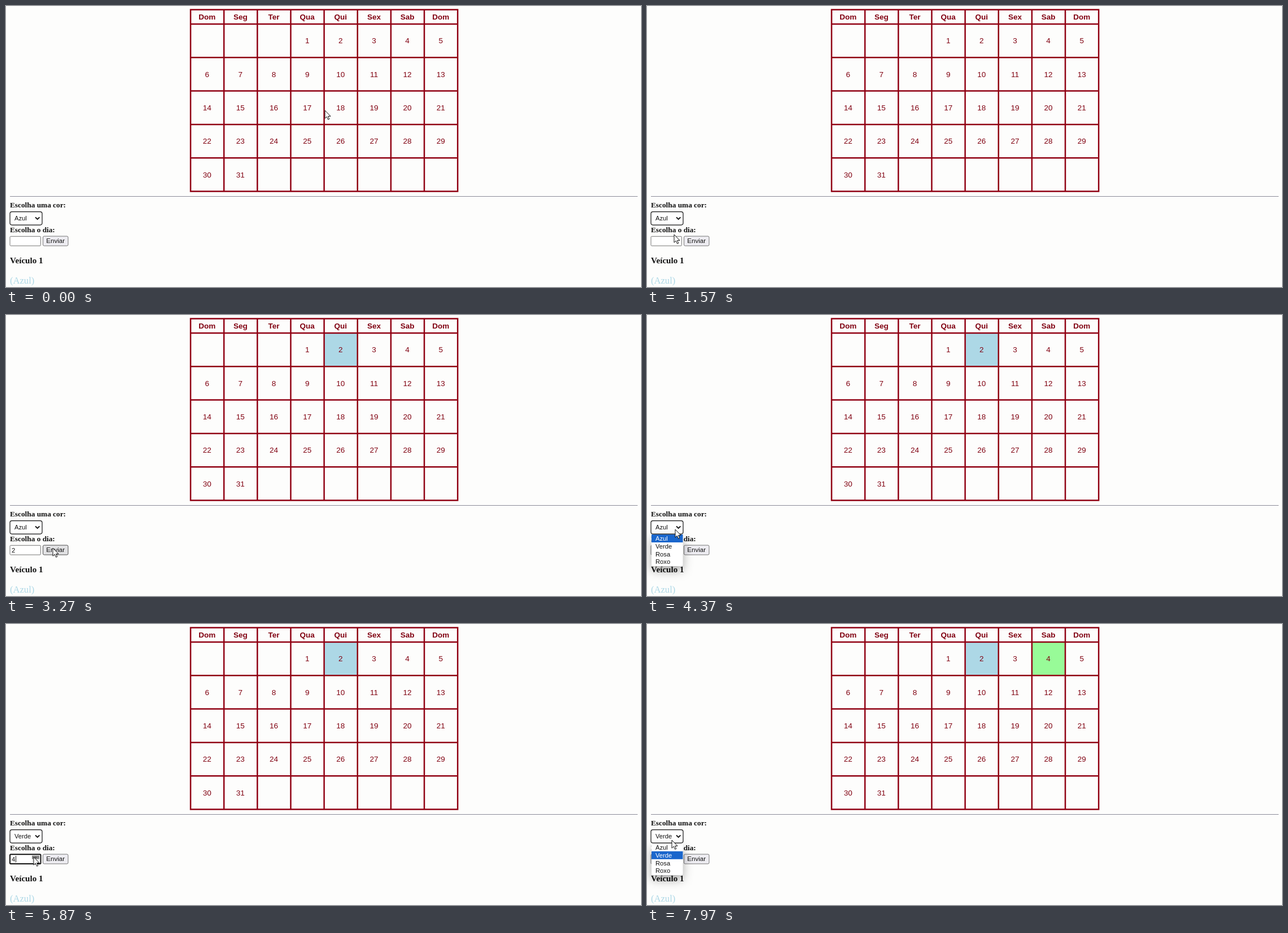
These frames come from a looping animation (1125 by 498 pixels, 8000 ms). An HTML page:

```html
<!DOCTYPE html>
<html lang="pt">
<head>
<meta charset="utf-8">
<style>
html, body { margin: 0; width: 100%; height: 100%; overflow: hidden; background: #fdfdfc; }
svg { display: block; }
text { white-space: pre; }
.sans { font-family: "Liberation Sans", Arial, sans-serif; font-size: 11.2px; fill: #111; }
.serif { font-family: "Liberation Serif", "Times New Roman", serif; font-weight: bold; font-size: 13.3px; fill: #111; }
.cal { font-size: 13.5px; fill: #800010; text-anchor: middle; }
</style>
</head>
<body>
<svg width="1125" height="498" viewBox="0 0 1125 498">
  <g id="calendar"></g>
  <path d="M7 337.5H1119" stroke="#8c8c98"/>

  <text class="serif" x="7" y="357">Escolha uma cor:</text>
  <rect x="7" y="364.7" width="57" height="23.4" rx="3.5" fill="#fff" stroke="#111" stroke-width="1.2"/>
  <text class="sans" id="color" x="15" y="380.4"></text>
  <path d="M52 374.3l3.7 3.7 3.7-3.7" fill="none" stroke="#111" stroke-width="1.9"/>

  <text class="serif" x="7" y="400.5">Escolha o dia:</text>
  <rect id="field" x="7" y="408.3" width="54.5" height="16.7" rx="1.5" fill="#fff"/>
  <text class="sans" id="day" x="10" y="420.5"></text>
  <path id="caret" d="M17.5 411v11.5" stroke="#111"/>
  <g id="spinner">
    <path d="M46 410.5h13v6.2H46z" id="up"/>
    <path d="M46 416.7h13v6H46z" fill="#eee"/>
    <path d="M50 415l2.5-3 2.5 3zM50 418.5l2.5 3 2.5-3z" fill="#505050"/>
  </g>
  <rect id="button" x="65.5" y="408" width="44.5" height="17" rx="2"/>
  <text class="sans" x="87.7" y="420.4" text-anchor="middle" style="font-size:11.6px">Enviar</text>

  <text class="serif" x="7" y="455.5" style="font-size:15.1px">Veículo 1</text>
  <text class="serif" x="7" y="491.5" style="font-size:16.6px;font-weight:normal;fill:#add8e6">(Azul)</text>

  <g id="menu">
    <path d="M8 389h55.5v53q0 3-3 3H11q-3 0-3-3z" fill="#fff" style="filter:drop-shadow(0 8px 9px #0005)"/>
    <rect id="mark" x="8" width="55.5" height="14" fill="#1a66cc"/>
  </g>
  <path id="cursor" d="M0 0V14.2L3.3 11.2 5.6 16.3 7.8 15.3 5.6 10.4H10z" fill="#fff" stroke="#111" stroke-linejoin="round"/>
</svg>
<script>
const $ = id => document.getElementById(id);
const colors = ['Azul', 'Verde', 'Rosa', 'Roxo'];
const path = [
  [0, 565, 185], [350, 565, 185], [1500, 50, 404], [1570, 48, 405], [1750, 49, 413],
  [2400, 49, 413], [2750, 83, 413], [3400, 83, 413], [4050, 50, 380], [4450, 50, 380],
  [4900, 32, 409], [5150, 32, 409], [5450, 49, 413], [6050, 49, 413], [6600, 90, 420],
  [7150, 90, 420], [7520, 44, 383], [8000, 44, 383]
];

function add(parent, tag, attrs, content = '') {
  const node = document.createElementNS('http://www.w3.org/2000/svg', tag);
  for (const key in attrs) node.setAttribute(key, attrs[key]);
  node.textContent = content;
  parent.append(node);
  return node;
}

// Calendar
const cal = $('calendar'), cell = 59.15, left = 327;
const highlight = (col, fill) =>
  add(cal, 'rect', { x: left + col * cell, y: 32, width: cell, height: 59.3, fill });
const blue = highlight(4, '#add8e6'), green = highlight(6, '#98fb98');
let grid = '';
for (let i = 0; i < 9; i++) grid += `M${left + i * cell} 5.3V329.7`;
for (const y of [6.5, ...[0, 1, 2, 3, 4, 5].map(i => 32 + i * 59.3)]) grid += `M325.8 ${y}H801`;
add(cal, 'path', { d: grid, stroke: '#900012', 'stroke-width': 2.5 });
['Dom', 'Seg', 'Ter', 'Qua', 'Qui', 'Sex', 'Sab', 'Dom'].forEach((name, i) =>
  add(cal, 'text', { class: 'sans cal', x: 356.2 + i * cell, y: 23.5, 'font-weight': 'bold' }, name));
for (let d = 1; d <= 31; d++) {
  // The first row ends at 5, then every row holds eight days.
  const slot = d < 6 ? d + 2 : d + 2;
  add(cal, 'text', {
    class: 'sans cal', x: 356.2 + slot % 8 * cell, y: 66.3 + Math.floor(slot / 8) * 59.3
  }, d);
}

const items = colors.map((name, i) =>
  add($('menu'), 'text', { class: 'sans', x: 15, y: 400 + i * 13.8 }, name));

const show = (node, on) => node.setAttribute('visibility', on ? 'visible' : 'hidden');
const within = (t, a, b) => t >= a && t < b;

function pointer(t) {
  const i = path.findIndex(p => p[0] > t);
  const [t0, x0, y0] = path[i - 1], [t1, x1, y1] = path[i];
  const u = (t - t0) / (t1 - t0), k = u * u * (3 - 2 * u);
  return [x0 + (x1 - x0) * k, y0 + (y1 - y0) * k];
}

function draw(t) {
  const [x, y] = pointer(t);
  $('cursor').setAttribute('transform', `translate(${x} ${y})`);
  const inside = (a, b) => within(x, a, b) && within(y, 408, 425);

  const chosen = t < 5100 ? 0 : 1;
  $('color').textContent = colors[chosen];
  $('day').textContent = t < 1900 ? '' : t < 2150 ? 1 : t < 5550 ? 2 : t < 5750 ? 3 : 4;
  show(blue, t >= 2950);
  show(green, t >= 6850);

  const focus = within(t, 1900, 2950) || within(t, 5550, 6850);
  const field = $('field');
  field.setAttribute('stroke', focus ? '#111' : '#767676');
  field.setAttribute('stroke-width', focus ? 2 : 1);
  show($('caret'), focus && (t - (t < 4000 ? 1900 : 5750) + 1000) % 1000 < 500);
  show($('spinner'), focus || inside(7, 62));
  $('up').setAttribute('fill', inside(46, 60) ? '#858585' : '#eee');

  const hover = inside(65, 110);
  $('button').setAttribute('fill', hover ? '#e2e2e4' : '#eeedf2');
  $('button').setAttribute('stroke', hover ? '#4f4f4f' : '#767676');

  const open = within(t, 4250, 5100) || t >= 7600;
  const picked = y > 389 ? Math.min(3, Math.floor((y - 389) / 13.8)) : chosen;
  show($('menu'), open);
  $('mark').setAttribute('y', 389 + picked * 13.8);
  items.forEach((item, i) => item.style.fill = i === picked ? '#fff' : '#111');
}

const start = performance.now();
function tick() {
  draw((performance.now() - start) % 8000);
  requestAnimationFrame(tick);
}
tick();
</script>
</body>
</html>
```
